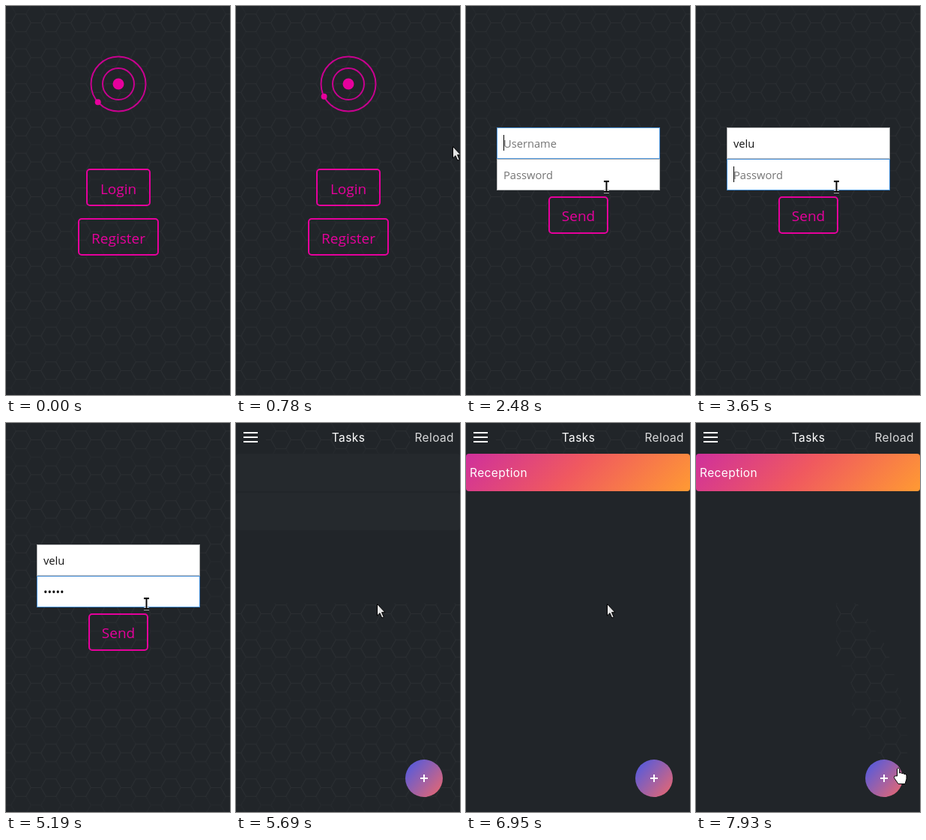
Recreate the animation shown at these times as an HTML page. Size 299x519 px, loop 7.99 s.

```html
<!DOCTYPE html>
<html lang="en">
<head>
<meta charset="utf-8">
<title>Task app</title>
<style>
  html, body { margin: 0; width: 100%; height: 100%; overflow: hidden; background: #212529; }
  svg { display: block; width: 299px; height: 519px; }
  .button rect { fill: none; stroke: #e6009c; stroke-width: 2; }
  .button text { fill: #e6009c; font: 19px "Open Sans", sans-serif; text-anchor: middle; }
  .field { fill: #fff; stroke: #b4b6b8; }
  .field.focus { stroke: #4a94dc; }
  .input { font: 14.7px "Open Sans", sans-serif; fill: #111; }
  .hint { fill: #757575; }
  .app { font: 15.5px Inter, sans-serif; letter-spacing: .4px; fill: #fff; }
  .outline { fill: none; stroke: #c8008f; stroke-width: 2; }
  #arrow { fill: #e4e4e4; stroke: #000; stroke-linejoin: round; }
  #hand { fill: #fff; stroke: #000; stroke-linejoin: round; }
  #beam { fill: none; }
</style>
</head>
<body>
<svg viewBox="0 0 299 519">
  <defs>
    <pattern id="hexes" y="-0.7" width="40" height="46.4" patternUnits="userSpaceOnUse">
      <g fill="none" stroke="#fff">
        <path stroke-opacity=".045" d="M6.7 23.2 13.3 11.6H26.7L33.3 23.2 26.7 34.8H13.3ZM0 23.2H6.7M33.3 23.2H40"/>
        <path stroke-opacity=".02" d="M0 0H6.7L13.3 11.6M26.7 11.6 33.3 0H40M0 46.4H6.7L13.3 34.8M26.7 34.8 33.3 46.4H40"/>
      </g>
    </pattern>
    <linearGradient id="fabFill" x1=".1" y1=".15" x2=".9" y2=".85">
      <stop stop-color="#5b5bd8"/><stop offset="1" stop-color="#db667a"/>
    </linearGradient>
    <linearGradient id="taskFill" gradientUnits="userSpaceOnUse" x1="62" y1="-21" x2="237" y2="153">
      <stop stop-color="#cf309c"/><stop offset=".48" stop-color="#f0595f"/><stop offset="1" stop-color="#ff9a33"/>
    </linearGradient>
    <clipPath id="trail"><rect id="trailBox" x="180" y="240" width="119" height="0"/></clipPath>
  </defs>

  <rect width="299" height="519" fill="#212529"/>
  <g fill="url(#hexes)">
    <rect id="hexAll" width="299" height="519"/>
    <rect id="hexHeader" x="40" width="192" height="41"/>
    <rect id="hexBody" y="240" width="299" height="279"/>
    <path id="hexTrail" clip-path="url(#trail)" d="M187 240H215L255 300 282 400V450H250L208 390V350L187 310Z"/>
  </g>

  <g id="welcome">
    <circle class="outline" cx="150" cy="104" r="36.5"/>
    <circle class="outline" cx="150" cy="104" r="21"/>
    <circle cx="150" cy="104" r="7.5" fill="#e6009c"/>
    <circle id="planet" r="4" fill="#e6009c"/>
    <g class="button">
      <rect x="108" y="218" width="84" height="48" rx="4" id="login"/>
      <text x="150" y="251">Login</text>
      <rect x="97" y="284" width="106" height="48" rx="4"/>
      <text x="150" y="317">Register</text>
    </g>
  </g>

  <g id="form">
    <rect id="nameField" class="field" x="41.5" y="162.5" width="217" height="41"/>
    <rect id="passField" class="field" x="41.5" y="204.5" width="217" height="41"/>
    <text id="nameText" class="input" x="50" y="189"></text>
    <text id="passText" class="input" x="50" y="231"></text>
    <rect id="caret" width="1" height="21"/>
    <g class="button">
      <rect x="111" y="255" width="78" height="48" rx="4"/>
      <text x="150" y="287">Send</text>
    </g>
  </g>

  <g id="tasks">
    <g id="rows"></g>
    <g id="task">
      <rect y="41" width="299" height="50" rx="4" fill="url(#taskFill)"/>
      <text class="app" x="5" y="72">Reception</text>
    </g>
    <text class="app" x="150" y="25" text-anchor="middle">Tasks</text>
    <text class="app" x="291" y="25" text-anchor="end" style="fill:#d9dadb">Reload</text>
    <circle cx="251" cy="474" r="25" fill="url(#fabFill)"/>
    <path id="icons" stroke="#fff" stroke-width="2" d="M10 13H29M10 19H29M10 25H29M246 474H256M251 469V479"/>
  </g>

  <g id="cursor">
    <path id="arrow" d="M.5.5V16L4 12.7 6.8 19 9.3 18 6.6 11.7H11Z"/>
    <path id="hand" d="M-1.5 11V1.5Q0-.8 1.7 1.5V7Q3.5 5.8 4.8 7.6 6.5 6.6 7.9 8.4 10 7.8 11 10V15L9 21.5H0L-5.5 13.5Q-5.8 10.5-3.5 10.8Z"/>
    <g id="beam">
      <path stroke="#e8e8e8" stroke-width="3.5" d="M-4-7H3M-4 7H3M-.5-8V8"/>
      <path stroke="#000" stroke-width="1.8" d="M-4-7H3M-4 7H3M-.5-7V7"/>
    </g>
  </g>
</svg>
<script>
const LOOP = 7990;
const $ = id => document.getElementById(id);
const show = (id, on) => { $(id).style.display = on ? '' : 'none'; };
const set = (id, attrs) => { for (const k in attrs) $(id).setAttribute(k, attrs[k]); };
const between = (t, a, b) => t >= a && t < b;

const POINTER = [
  [780, 289, 187], [840, 246, 213], [900, 215, 230], [960, 197, 239], [1020, 188, 241],
  [7570, 191, 253], [7630, 200, 284], [7690, 216, 322], [7750, 232, 362],
  [7810, 248, 400], [7870, 260, 432], [7930, 270, 460]
];
const NAME = 'velu';
const ROW_FILLS = ['#2d3439', '#2d3439', '#2d3439', '#2d3439', '#2c2f35',
  '#2b2f35', '#2a2e33', '#292c31', '#272b30', '#262a2f'];

const rows = ROW_FILLS.map((fill, i) => {
  const row = document.createElementNS('http://www.w3.org/2000/svg', 'rect');
  row.setAttribute('y', 41 + 52 * i);
  row.setAttribute('width', 299);
  row.setAttribute('height', 50);
  row.setAttribute('rx', 4);
  $('rows').append(row);
  return row;
});

// Number of characters typed, one per interval from start
const typed = (t, start, gap, max) => Math.max(0, Math.min(max, Math.floor((t - start) / gap) + 1));

function drawWelcome(t) {
  const angle = (138.4 + 18.4 * Math.floor(t / 60) * .06) * Math.PI / 180;
  set('planet', { cx: 150 + 36.5 * Math.cos(angle), cy: 104 + 36.5 * Math.sin(angle) });
  const hover = Math.max(0, Math.min(1, (t - 960) / 150));
  $('login').style.fill = `rgba(17,19,21,${hover})`;
}

function drawInput(id, text, hint) {
  $(id).textContent = text || hint;
  $(id).classList.toggle('hint', !text);
}

function drawForm(t) {
  const onPass = t >= 3580;
  $('nameField').classList.toggle('focus', !onPass);
  $('passField').classList.toggle('focus', onPass);
  drawInput('nameText', NAME.slice(0, typed(t, 3055, 75, 4)), 'Username');
  drawInput('passText', '•'.repeat(typed(t, 4330, 90, 5)), 'Password');

  const text = $(onPass ? 'passText' : 'nameText');
  const empty = text.classList.contains('hint');
  set('caret', { x: empty ? 50 : Math.round(50 + text.getComputedTextLength()), y: onPass ? 214 : 172 });
  const off = [[1990, 2480], [2980, 3055], [3580, 3650], [4150, 4330], [5190, 5320]];
  show('caret', !off.some(([a, b]) => between(t, a, b)));
}

function drawTasks(t) {
  show('icons', t >= 5630);
  show('task', t >= 6950);
  show('rows', between(t, 5630, 6950));
  const loaded = t >= 6700;
  rows.forEach((row, i) => {
    row.setAttribute('fill', loaded ? ROW_FILLS[i] : '#25292d');
    row.style.display = loaded || i < 2 ? '' : 'none';
  });
}

function drawPointer(t) {
  const spot = POINTER.filter(p => t >= p[0]).pop();
  show('cursor', spot);
  if (!spot) return;
  const [, x, y] = spot;
  set('cursor', { transform: `translate(${x} ${y})` });
  set('trailBox', { height: Math.max(0, y - 240) });
  const beam = between(t, 1430, 5320);
  const hand = between(t, 1020, 1430) || t >= 7930;
  show('beam', beam);
  show('hand', hand);
  show('arrow', !beam && !hand);
}

function draw(t) {
  const onForm = between(t, 1490, 5320), onTasks = t >= 5320;
  show('welcome', t < 1490);
  show('form', onForm);
  show('tasks', onTasks);
  show('hexAll', !onTasks);
  show('hexHeader', onTasks);
  show('hexBody', between(t, 5320, 6700));
  show('hexTrail', t >= 7570);
  if (onTasks) drawTasks(t);
  else if (onForm) drawForm(t);
  else drawWelcome(t);
  drawPointer(t);
}

let start;
function tick(now) {
  start ??= now;
  draw((now - start) % LOOP);
  requestAnimationFrame(tick);
}
draw(0);
requestAnimationFrame(tick);
</script>
</body>
</html>
```
